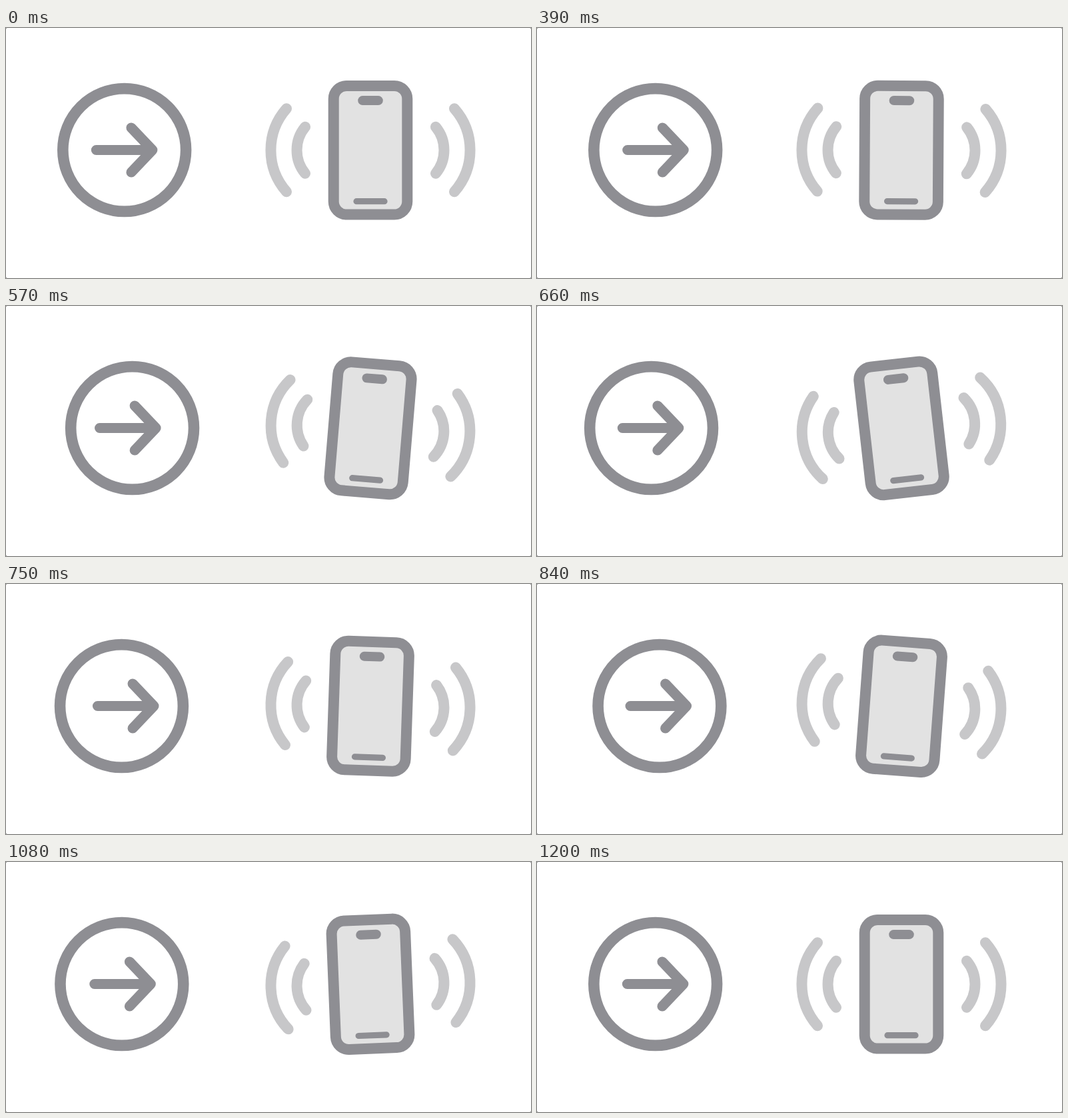
An HTML page that plays this animation: 788x376 px, repeating every 1380 ms.

```html
<!DOCTYPE html>
<html lang="en">
<head>
<meta charset="utf-8">
<title>Wiggle</title>
<style>
  html, body { margin: 0; width: 100%; height: 100%; overflow: hidden; background: #777; }
  svg { display: block; width: 788px; height: 376px; background: #fff; border-radius: 2px; }
  .line { fill: none; stroke: #8e8e93; stroke-linecap: round; stroke-linejoin: round; }
  .wave { fill: none; stroke: #c7c7c9; stroke-width: 16; stroke-linecap: round; }
  .solid { fill: #8e8e93; }
</style>
</head>
<body>
<svg viewBox="0 0 788 376">
  <circle id="ring" class="line" cx="177.7" cy="183.5" r="92.4" stroke-width="16.6"/>
  <path id="arrow" class="line" stroke-width="15.2" d="M135.4 183.5H219.8M188 150L219.8 183.5L188 217"/>
  <!-- Phone and waves, centred on their pivot -->
  <g id="phone">
    <path class="wave" d="M-126 -62.5A94.7 94.7 0 0 0 -126 62.5M-98 -35A55.3 55.3 0 0 0 -98 35"/>
    <path class="wave" d="M126 -62.5A94.7 94.7 0 0 1 126 62.5M98 -35A55.3 55.3 0 0 1 98 35"/>
    <rect x="-55.3" y="-96.8" width="110.6" height="193.6" rx="19.5" fill="#e2e2e2" stroke="#8e8e93" stroke-width="16"/>
    <rect class="solid" x="-18.8" y="-81.7" width="37.6" height="14" rx="7"/>
    <rect class="solid" x="-25.6" y="72.3" width="51.2" height="9.2" rx="4.6"/>
  </g>
</svg>
<script>
  const LOOP = 1380, STEP = 30;

  // Turning points of each swing: [time in ms, value]
  const tilt = [[370, 0], [526, 8], [666, -6.5], [803, 6], [945, -5.1], [1200, 0]];
  const slide = [[385, 0], [558, 12.3], [692, -9], [846, 6.3], [1002, -5.8], [1200, 0]];

  function swing(points, t) {
    const next = points.findIndex(p => p[0] > t);
    if (next < 1) return 0;
    const [t0, a] = points[next - 1], [t1, b] = points[next];
    return a + (b - a) * (1 - Math.cos(Math.PI * (t - t0) / (t1 - t0))) / 2;
  }

  const part = id => document.getElementById(id);
  const ring = part("ring"), arrow = part("arrow"), phone = part("phone");

  function draw(now) {
    const t = Math.floor(now % LOOP / STEP) * STEP;
    const angle = swing(tilt, t);
    ring.setAttribute("transform", `translate(${swing(slide, t)} 0)`);
    arrow.setAttribute("transform", `translate(${angle * 1.1} 0)`);
    phone.setAttribute("transform", `translate(547 183.8) rotate(${angle})`);
  }

  const start = performance.now();
  function tick() {
    draw(performance.now() - start);
    requestAnimationFrame(tick);
  }
  tick();
</script>
</body>
</html>
```
